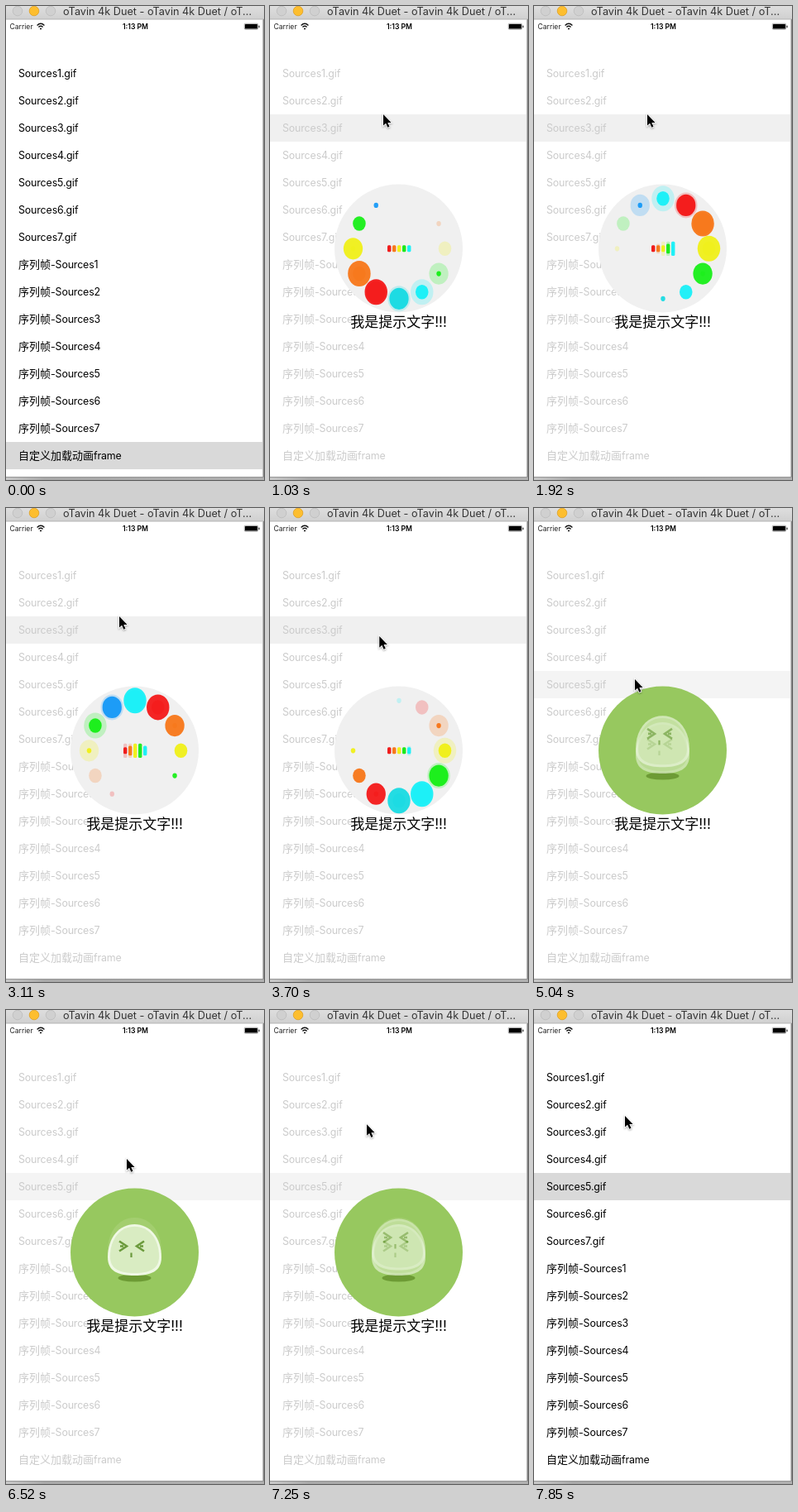
An HTML page for the animation above (8 s loop, 312 px wide and 573 px high).

```html
<!DOCTYPE html>
<html lang="zh">
<head>
<meta charset="utf-8">
<style>
  html, body { margin: 0; width: 100%; height: 100%; overflow: hidden; background: #fff; }
  svg { display: block; font-family: Inter, "Noto Sans CJK SC", "Noto Sans CJK", sans-serif; }
  #rows { font-size: 13px; }
  #rows tspan { font-size: 12.4px; letter-spacing: -.14px; }
</style>
</head>
<body>
<svg width="312" height="573" viewBox="0 0 312 573">
  <defs>
    <linearGradient id="bar" x2="0" y2="1">
      <stop stop-color="#dedede"/><stop offset="1" stop-color="#d0d0d0"/>
    </linearGradient>
    <linearGradient id="base">
      <stop stop-color="#c8c8c8"/><stop offset=".15" stop-color="#a8a8a8"/><stop offset="1" stop-color="#b0b0b0"/>
    </linearGradient>
    <path id="dome" d="M123 299C123 275 137 259 155.5 259S188 275 188 299C188 316 175 321 155.5 321S123 316 123 299Z"/>
    <g id="face" fill="none" stroke="#6b9a3c" stroke-width="2.6">
      <path d="M137 279.5L146 285.5L137 291.5M167 279.5L158 285.5L167 291.5M138 285.5H142M162 285.5H166"/>
      <path d="M151.5 293.5V299" stroke-width="2.2"/>
    </g>
  </defs>
  <rect width="312" height="573" fill="#fff"/>
  <g id="rows"></g>
  <g id="loader"></g>
  <rect width="312" height="16" fill="url(#bar)"/>
  <rect y="15.5" width="312" height="1" fill="#b4b4b4"/>
  <g stroke-width=".8">
    <circle cx="14" cy="6" r="5.8" fill="#d0d0d0" stroke="#bcbcbc"/>
    <circle cx="34" cy="6" r="5.8" fill="#fdbe2f" stroke="#dfa023"/>
    <circle cx="54" cy="6" r="5.8" fill="#d0d0d0" stroke="#bcbcbc"/>
  </g>
  <text x="69" y="11" font-size="12.7" fill="#333">oTavin 4k Duet - oTavin 4k Duet / oT...</text>
  <text x="4.5" y="28" font-size="8.6" fill="#222">Carrier</text>
  <g fill="none" stroke="#111" stroke-width="1.4">
    <path d="M37.6 23.4Q42 19.2 46.4 23.4M39.4 25.4Q42 23 44.6 25.4"/>
    <path d="M41.2 27L42 27.7L42.8 27"/>
  </g>
  <text x="156.5" y="28" font-size="8.6" font-weight="600" text-anchor="middle">1:13 PM</text>
  <rect x="288.3" y="21.3" width="16.4" height="6.9" rx="1.2" fill="#fff" stroke="#666" stroke-width=".6"/>
  <rect x="289" y="22" width="15" height="5.5" rx=".5"/>
  <rect x="305.5" y="23.4" width="1" height="2.8" rx=".5"/>
  <rect x="310" y="16" width="1" height="554" fill="#c8c8c8"/>
  <rect x="311" y="16" width="1" height="557" fill="#858585"/>
  <rect y="569" width="312" height="4" fill="url(#base)"/>
  <rect y="569" width="312" height="1" fill="#969696"/>
  <g id="cursor">
    <path d="M0 0V13.6L3.1 10.8L5.3 15.8L7.5 14.8L5.3 10H9.6Z" stroke="#fff" stroke-width="1.6" paint-order="stroke"
      style="filter: drop-shadow(0 1px 1px #0005)"/>
  </g>
</svg>
<script>
const $ = id => document.getElementById(id);
const LOOP = 8000, STEP = 148;
const labels = [
  ...Array.from({length: 7}, (_, i) => `Sources${i + 1}.gif`),
  ...Array.from({length: 7}, (_, i) => `序列帧-Sources${i + 1}`),
  '自定义加载动画frame'
].map(s => s.replace(/[!-~]+/, '<tspan>$&</tspan>'));
const hues = ['#00f0f8', '#f40000', '#f86800', '#f0f000', '#00ee00', '#00f0f8',
              '#00d8e0', '#f40000', '#f86800', '#f0f000', '#00ee00', '#0090f8'];
const barHues = ['#f00000', '#f86800', '#f0f000', '#00e800', '#00f0f8'];
const hops = [.6, 1, .5, .5, 0, .2];
// time, x, y of the pointer tip
const track = [[440, 180, 300], [892, 137, 131], [3260, 137, 131], [4444, 122, 207],
               [5184, 122, 207], [6072, 146, 180], [6516, 146, 180], [7550, 110, 128]];

const gap = (i, c) => ((i - c + 18) % 12 + 12) % 12 - 6;

function rows(selected, dim) {
  const shade = dim ? (selected === 3 ? '#f0f0f0' : '#f4f4f4') : '#d9d9d9';
  return `<rect y="${32 + 33 * selected}" width="310" height="33" fill="${shade}"/>` +
    labels.map((s, i) =>
      `<text x="15" y="${86.3 + 33 * i}" fill="${dim ? '#cbcbcb' : '#000'}">${s}</text>`).join('');
}

function wave(center, alpha) {
  let out = '';
  hues.forEach((hue, i) => {
    const size = Math.cos(Math.PI * gap(i, center) / 8);
    if (size < .01) return;
    const a = i * Math.PI / 6;
    out += `<ellipse cx="${156 + 55.5 * Math.sin(a)}" cy="${293.3 - 60.5 * Math.cos(a)}"
      rx="${14 * size}" ry="${15.8 * size}" fill="${hue}" opacity="${alpha}"/>`;
  });
  barHues.forEach((hue, i) => {
    const d = gap(i, center + 2);
    const h = 8 + 10 * (Math.abs(d) < 2 ? Math.cos(Math.PI * d / 4) : 0);
    out += `<rect x="${142 + 6 * i}" y="${293.3 - h / 2}" width="4.4" height="${h}" rx="1.5"
      fill="${hue}" opacity="${alpha}"/>`;
  });
  return out;
}

function dots(n) {
  const c = 2.5 + Math.round((n - 11) * 1.25);
  return wave(c - 2, .2) + wave(c, .85);
}

function slime(u, alpha) {
  return `<g opacity="${alpha}"><g transform="translate(0 ${-13 * u})">
    <use href="#dome" fill="#eff8e4"/>
    <use href="#dome" fill="#d9ecc2" transform="translate(14 26) scale(.91)"/></g>
    <use href="#face" transform="translate(0 ${-21 * u})"/></g>`;
}

function hopper(n) {
  const u = hops[(n + 28) % 6];
  return `<ellipse cx="155.5" cy="324" rx="20" ry="4.6" fill="#6d9b35"/>
    <use href="#dome" fill="#cfe6b0" opacity=".2" transform="translate(0 -8)"/>` +
    slime(0, 1 - .75 * u) + (u ? slime(u, u) : '');
}

const hud = (color, art) =>
  `<circle cx="155.5" cy="293" r="77.5" fill="${color}"/>${art}
   <text x="155.5" y="387.5" font-size="17" text-anchor="middle">我是提示文字!!!</text>`;

function pointer(q) {
  const last = track[track.length - 1];
  const k = track.findIndex(p => p[0] > q);
  if (k < 0) return last.slice(1);
  const a = track[k - 1], b = track[k];
  let f = (q - a[0]) / (b[0] - a[0]);
  f *= f * (3 - 2 * f);
  return [1, 2].map(j => a[j] + (b[j] - a[j]) * f);
}

function draw(n) {
  const q = n < 0 ? 0 : 300 + STEP * n;
  const first = q >= 892 && q < 4296, second = q >= 4592 && q < 7700;
  $('rows').innerHTML = rows(q < 892 ? 15 : q < 4592 ? 3 : 5, first || second);
  $('loader').innerHTML = first ? hud('#f0f0f0', dots(n)) : second ? hud('#97c85f', hopper(n)) : '';
  const visible = q >= track[0][0];
  $('cursor').setAttribute('visibility', visible ? 'visible' : 'hidden');
  if (visible) $('cursor').setAttribute('transform', `translate(${pointer(q)})`);
}

let shown;
function tick() {
  const t = performance.now() % LOOP;
  const n = t < 300 ? -1 : Math.floor((t - 285) / STEP);
  if (n !== shown) draw(shown = n);
  requestAnimationFrame(tick);
}
tick();
</script>
</body>
</html>
```
